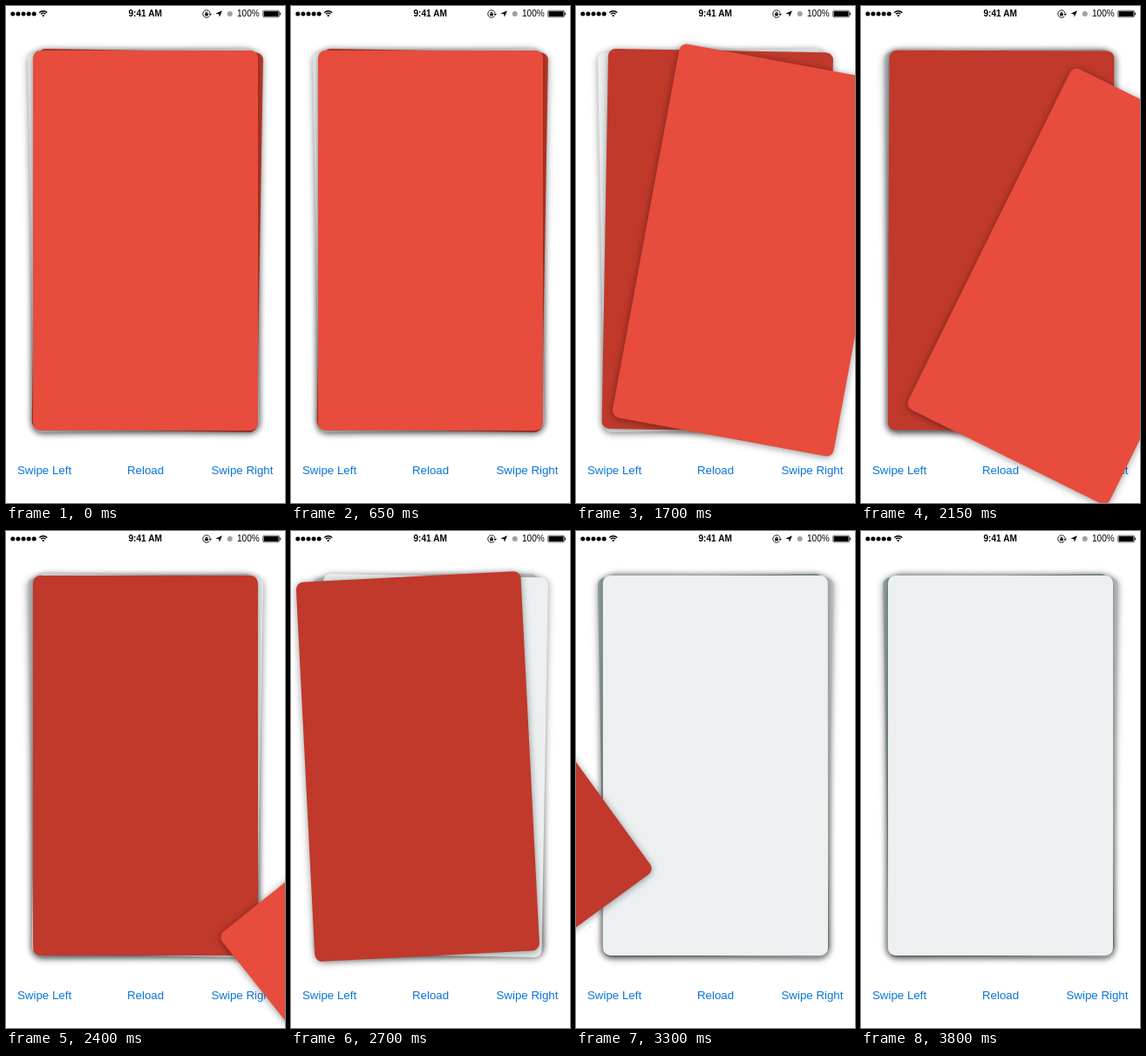
These frames come from a looping animation (320 by 569 pixels, 3850 ms). An HTML page with a canvas:

```html
<!DOCTYPE html>
<html lang="en">
<head>
<meta charset="utf-8">
<title>Swipeable cards</title>
<style>
html, body { margin: 0; width: 100%; height: 100%; overflow: hidden; background: #fff; }
body { position: relative; font-family: "Liberation Sans", Arial, sans-serif; }
canvas { position: absolute; left: 0; top: 0; width: 320px; height: 569px; }
span { position: absolute; white-space: nowrap; }
.button { top: 524.4px; font-size: 13.3px; line-height: 16px; color: #0a74d8; }
.status { top: 3px; font-size: 10.1px; line-height: 12px; color: #000; }
</style>
</head>
<body>
<span class="button" style="left:13px">Swipe Left</span>
<span class="button" style="left:139px">Reload</span>
<span class="button" style="left:235.5px">Swipe Right</span>
<canvas id="stage"></canvas>
<span class="status" style="left:140.5px;font-weight:bold">9:41 AM</span>
<span class="status" style="left:265px">100%</span>
<script>
const LOOP = 3850, W = 320, H = 569;
const CARD = { x: 160, y: 268.5, w: 258, h: 435, r: 8.5 };
const PIVOT = 0.3 * CARD.h;
const COLORS = ['#e74c3c', '#c0392b', '#ecf0f1', '#bdc3c7', '#95a5a6'];
const TILT = [0, 1, -1];
const RELEASES = [2080, 3050];
const RAD = Math.PI / 180;

// Dragged cards: time, x offset, y offset, degrees
const PATHS = [
  [[650, 0, 0, 0], [780, -22, 0, -4.4], [920, -45, 2, -9], [1060, -26, 1, -5],
   [1200, 3.7, 0.3, 0], [1350, 30, 4, 6], [1500, 46, 9, 10], [1700, 47, 11, 10.5],
   [1900, 52, 16, 13], [2080, 66, 30, 18], [2150, 102, 52, 26.2],
   [2300, 222, 110, 40], [2500, 400, 190, 58]],
  [[2500, 0, 0, 0], [2600, -5, 0.3, -1], [2700, -14.5, 1, -2.9], [2850, -30, 2, -6.5],
   [2970, -46, 4, -11], [3040, -60, 6, -14], [3100, -90, 8, -19],
   [3250, -235, 16, -31], [3400, -400, 25, -43]]
];

const canvas = document.getElementById('stage');
const ctx = canvas.getContext('2d');
const dpr = window.devicePixelRatio || 1;
canvas.width = W * dpr;
canvas.height = H * dpr;

function slope(keys, i, k) {
  if (i === 0 || i === keys.length - 1) return 0;
  const a = keys[i - 1], b = keys[i + 1];
  return (b[k] - a[k]) / (b[0] - a[0]);
}

// Smooth Hermite interpolation through the keys
function follow(keys, t) {
  const last = keys.length - 1;
  if (t <= keys[0][0]) return keys[0].slice(1);
  if (t >= keys[last][0]) return keys[last].slice(1);
  const i = keys.findIndex(key => key[0] > t) - 1;
  const a = keys[i], b = keys[i + 1], d = b[0] - a[0], u = (t - a[0]) / d;
  const h = u * u * (3 - 2 * u);
  return [1, 2, 3].map(k => a[k] + (b[k] - a[k]) * h +
    d * u * (1 - u) * ((1 - u) * slope(keys, i, k) - u * slope(keys, i + 1, k)));
}

function settle(ms) {
  return 1 - Math.exp(-ms / 75) * Math.cos(ms / 90);
}

function tilt(i, released, t) {
  const rank = i - released;
  if (!released) return TILT[rank];
  const from = TILT[rank + 1] || 0;
  return from + (TILT[rank] - from) * settle(t - RELEASES[released - 1]);
}

function drawCard(color, x, y, deg, lean) {
  ctx.save();
  ctx.translate(CARD.x + x, CARD.y + y);
  ctx.rotate(deg * RAD);
  ctx.translate(0, PIVOT);
  ctx.rotate(lean * RAD);
  ctx.translate(0, -PIVOT);
  ctx.shadowColor = 'rgba(0,0,0,0.42)';
  ctx.shadowBlur = 9 * dpr;
  ctx.shadowOffsetY = 1.3 * dpr;
  ctx.fillStyle = color;
  ctx.beginPath();
  ctx.roundRect(-CARD.w / 2, -CARD.h / 2, CARD.w, CARD.h, CARD.r);
  ctx.fill();
  ctx.restore();
}

function drawCards(t) {
  const released = RELEASES.filter(r => t >= r).length;
  for (let i = released + 2; i >= 0; i--) {
    const path = PATHS[i];
    if (path && t >= path[path.length - 1][0]) continue;
    const [x, y, deg] = path ? follow(path, t) : [0, 0, 0];
    drawCard(COLORS[i], x, y, deg, i < released ? 0 : tilt(i, released, t));
  }
}

function dot(x, y, r) {
  ctx.beginPath();
  ctx.arc(x, y, r, 0, 7);
  ctx.fill();
}

function arc(x, y, r, from, to) {
  ctx.beginPath();
  ctx.arc(x, y, r, from * RAD, to * RAD);
  ctx.stroke();
}

function polygon(...points) {
  ctx.beginPath();
  points.forEach(p => ctx.lineTo(...p));
  ctx.closePath();
  ctx.fill();
}

function drawStatus() {
  ctx.fillStyle = ctx.strokeStyle = '#000';
  for (let i = 0; i < 5; i++) dot(7.8 + i * 6.1, 9, 2.5);

  // Wireless
  ctx.lineWidth = 1.4;
  arc(42.7, 12, 6.3, -136, -44);
  arc(42.7, 12, 3.8, -136, -44);
  polygon([42.7, 12.6], [41.2, 10.7], [42.7, 10.1], [44.2, 10.7]);

  // Rotation lock
  ctx.lineWidth = 0.9;
  arc(230, 9, 4.2, 35, 345);
  polygon([232.4, 8.7], [236, 8.7], [234.2, 10.9]);
  ctx.fillRect(228.2, 8.4, 3.6, 2.8);
  arc(230, 8.4, 1.2, 180, 360);

  // Location
  polygon([248, 5.2], [244.8, 12.8], [244.2, 9.2], [240.4, 8.7]);

  ctx.fillStyle = '#a0a0a0';
  dot(256.8, 9, 3);

  // Battery
  ctx.fillStyle = '#000';
  ctx.lineWidth = 0.6;
  ctx.beginPath();
  ctx.roundRect(294.7, 5.2, 18.8, 7.6, 1.4);
  ctx.stroke();
  ctx.fillRect(295.6, 6.1, 17, 5.8);
  ctx.fillRect(314.2, 7.6, 1, 2.8);
}

function frame(now) {
  ctx.setTransform(dpr, 0, 0, dpr, 0, 0);
  ctx.clearRect(0, 0, W, H);
  drawCards(now % LOOP);
  drawStatus();
  requestAnimationFrame(frame);
}
frame(performance.now());
</script>
</body>
</html>
```
